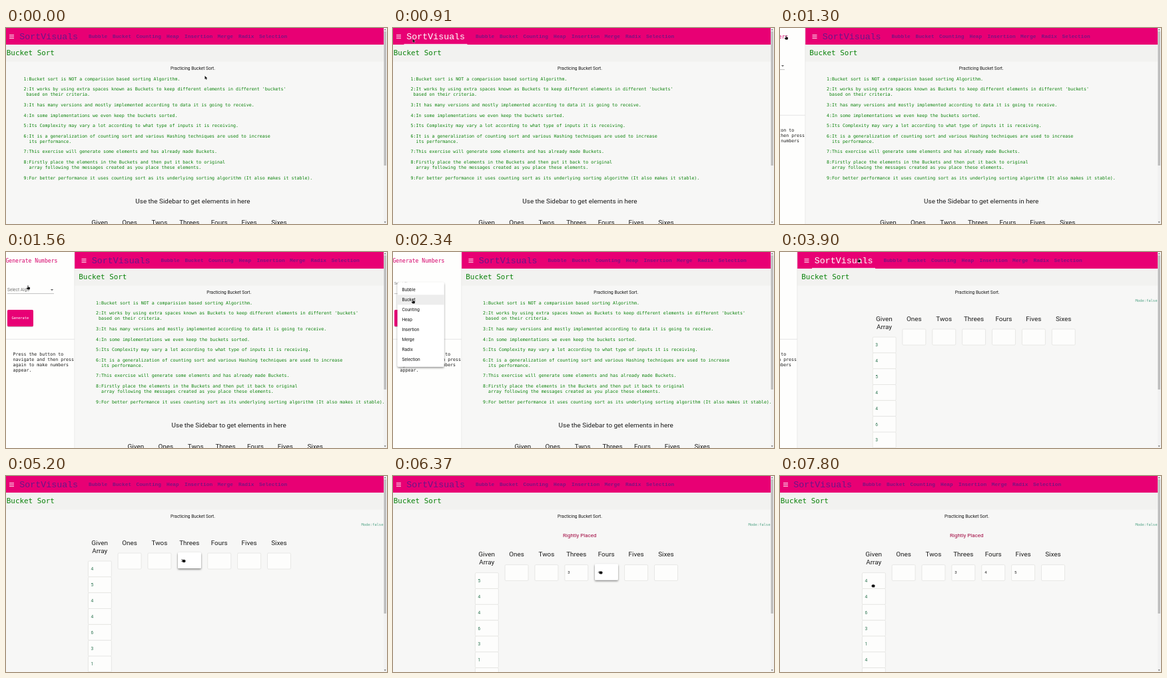
Animation of 572 by 295 pixels, one loop 8000 ms. Source, as an HTML page:

```html
<!DOCTYPE html>
<html lang="en">
<head>
<meta charset="utf-8">
<title>Bucket Sort</title>
<style>
  html, body { margin: 0; width: 100%; height: 100%; overflow: hidden; background: #f7f7f6; }
  svg { display: block; width: 572px; height: 295px; }
  text { font-family: Roboto, sans-serif; font-size: 6.62px; fill: #1c1c1c; white-space: pre; }
  .mono { font-family: "DejaVu Sans Mono", monospace; font-size: 6.61px; }
  .courier { font-family: "Liberation Mono", monospace; }
  .green { fill: #0a820a; }
  .big { font-size: 9.93px; }
  .mid { text-anchor: middle; }
  .cell { fill: #fdfdfc; stroke: #e2e2e0; stroke-width: .8; }
  .value { fill: #2b7350; }
</style>
</head>
<body>
<svg id="stage" viewBox="0 0 572 295">
  <defs>
    <filter id="lift" x="-30%" y="-30%" width="160%" height="180%">
      <feDropShadow dx="0" dy="1.6" stdDeviation="1.7" flood-color="#000" flood-opacity=".45"/>
    </filter>
    <filter id="rest" x="-20%" y="-20%" width="140%" height="150%">
      <feDropShadow dx="0" dy=".7" stdDeviation=".6" flood-color="#000" flood-opacity=".3"/>
    </filter>
  </defs>
  <g id="drawer"></g>
  <g id="main"></g>
  <g id="center"></g>
  <text id="mode" class="mono" x="566.5" y="75" text-anchor="end" style="font-size:5.5px;fill:#55a588">Mode:false</text>
  <g id="scroll">
    <rect x="567" width="5" height="295" fill="#f1f1f1"/>
    <rect x="567.4" y="5" width="3.4" height="202" fill="#bcbcbc"/>
    <path d="M567.6 3.2l1.5-1.7 1.5 1.7zM567.6 291.6l1.5 1.7 1.5-1.7z" fill="#555"/>
  </g>
  <g id="menu"></g>
  <g id="card"></g>
  <g id="cursor"></g>
</svg>
<script>
const LOOP = 8000, STEP = 130;
const OPEN = 108.5, PINK = '#e80074';
const $ = id => document.getElementById(id);
const text = (x, y, str, cls = '', style = '') =>
  `<text x="${x}" y="${y}" class="${cls}" style="${style}">${str}</text>`;
const show = (el, on) => el.setAttribute('display', on ? 'inline' : 'none');
const move = (el, x, y = 0) => el.setAttribute('transform', `translate(${x} ${y})`);
const clamp = v => Math.max(0, Math.min(1, v));
const ease = v => v * v * (3 - 2 * v);

// Value of a list of [time, ...numbers] keys at time t.
function track(keys, t, curve = v => v) {
  let i = keys.length - 1;
  while (i > 0 && keys[i][0] > t) i--;
  const a = keys[i], b = keys[i + 1] || a;
  const p = b === a ? 0 : curve(clamp((t - a[0]) / (b[0] - a[0])));
  return a.slice(1).map((v, k) => typeof v === 'number' ? v + (b[k + 1] - v) * p : v);
}

// ---- timeline ----
const slide = [[0, 0], [1170, 0], [1300, 43.5], [1430, 99], [1560, OPEN],
  [3770, OPEN], [3900, 31.5], [4030, 0]];
const path = [
  [0, 298.5, 72, 'arrow'], [260, 298.5, 72, 'arrow'], [1040, 8, 12, 'hand'],
  [1300, 9, 12, 'hand'], [1560, 33, 51, 'hand'], [1820, 33, 56, 'hand'],
  [1950, 33, 57, 'hand'], [2340, 30, 72, 'hand'], [2600, 30, 72, 'hand'],
  [2990, 11, 98, 'hand'], [3380, 11, 98, 'hand'], [3770, 117, 11, 'hand'],
  [3900, 118, 10, 'hand'], [4550, 132.5, 140.5, 'fist'], [4680, 132.5, 140.5, 'fist'],
  [5200, 267, 127.5, 'fist'], [5590, 267, 128, 'fist'], [5980, 132.5, 158, 'fist'],
  [6370, 312, 145, 'fist'], [6500, 312, 146, 'fist'], [6760, 132.5, 158, 'fist'],
  [7150, 357, 145, 'fist'], [7280, 357, 146, 'fist'], [7540, 285, 150, 'fist'],
  [7800, 140, 165, 'fist']
];
const menuOpen = 1950, menuClose = 2600, filled = 3380, message = 5460;
const drags = [
  { grab: 4680, drop: 5330, col: 3 },
  { grab: 5980, drop: 6500, col: 4 },
  { grab: 6760, drop: 7280, col: 5 }
];
const values = [3, 4, 5, 4, 4, 6, 3, 1, 4, 2, 5];
const ROW = 23.85;
const colX = i => 140.7 + i * 44.88;
const cell = (x, y, h = 24) => `<rect class="cell" x="${x}" y="${y}" width="35" height="${h}" rx="1.6"/>`;

// ---- side drawer, in its opened place ----
$('drawer').innerHTML = `
  <rect x="-10" width="113" height="295" fill="#fefefd"/>
  ${text(-.6, 15.6, 'Generate Numbers', 'mono', 'font-size:8.1px;fill:#d6006a')}
  <text id="label" x="2"></text>
  ${text(2, 59.2, '<tspan id="choice">Bucket</tspan>')}
  <path d="M2 62.6H72" stroke="#999" stroke-width=".6"/>
  <path d="M66.9 56h4.2l-2.1 2.2z" fill="#666"/>
  <rect id="button" x="2" y="87" width="39" height="25" rx="1.7" fill="${PINK}"/>
  ${text(8.4, 101.4, 'Generate', 'mono', 'font-size:5.4px;fill:#fff')}
  <path d="M-10 131.3H103" stroke="#dcdcdc" stroke-width=".7"/>
  ${['Press the button to', 'navigate and then press', 'again to make numbers', 'appear.']
    .map((s, i) => text(10.5, 156.2 + i * 7.83, s, 'mono')).join('')}`;

// ---- header and intro ----
const nav = { Bubble: 124, Bucket: 160, Counting: 195.5, Heap: 241, Insertion: 268,
  Merge: 317.5, Radix: 349, Selection: 380 };
const intro = [
  [0, 0, '1:Bucket sort is NOT a comparision based sorting Algorithm.'],
  [2, 0, "2:It works by using extra spaces known as Buckets to keep different elements in different 'buckets'"],
  [3, 1, 'based on their criteria.'],
  [5, 0, '3:It has many versions and mostly implemented according to data it is going to receive.'],
  [7, 0, '4:In some implementations we even keep the buckets sorted.'],
  [9, 0, '5:Its Complexity may vary a lot according to what type of inputs it is receiving.'],
  [11, 0, '6:It is a generalization of counting sort and various Hashing techniques are used to increase'],
  [12, 2, 'its performance.'],
  [14, 0, '7:This exercise will generate some elements and has already made Buckets.'],
  [16, 0, '8:Firstly place the elements in the Buckets and then put it back to original'],
  [17, 2, 'array following the messages created as you place these elements.'],
  [19, 0, '9:For better performance it uses counting sort as its underlying sorting algorithm (It also makes it stable).']
];
$('main').innerHTML = `
  <rect x="-5.6" width="600" height="295" fill="#f7f7f6"/>
  <rect x="-5.6" y="25" width="600" height="25.5" fill="#f2f2f0"/>
  <rect x="-5.6" width="600" height="25" fill="${PINK}"/>
  <path d="M-5.6 0V295" stroke="#ddd" stroke-width=".6"/>
  <path d="M5 10.6h7M5 13h7M5 15.4h7" stroke="#fff" stroke-width=".9"/>
  <text id="logo" class="courier" x="20.3" y="17" style="font-size:13.3px">SortVisuals</text>
  <path id="logoLine" d="M16.5 24.4H111.5" stroke="#fff" stroke-width=".9"/>
  ${Object.entries(nav).map(([s, x]) =>
    text(x, 15.3, s, 'courier', 'font-size:7.8px;font-weight:bold;fill:#7d1280')).join('')}
  ${text(.8, 41.4, 'Bucket Sort', 'mono green', 'font-size:10.9px')}
  <g id="intro">${intro.map(([row, pad, s]) =>
    text(26.6 + pad * 3.98, 78.8 + row * 7.83, s, 'mono green')).join('')}</g>`;

// ---- centred content ----
const titles = ['Given', 'Ones', 'Twos', 'Threes', 'Fours', 'Fives', 'Sixes'];
$('center').innerHTML = `
  ${text(280.5, 62.8, 'Practicing Bucket Sort.', 'mid')}
  ${text(280.5, 264.2, '<tspan id="hint">Use the Sidebar to get elements in here</tspan>', 'mid big')}
  ${text(280.3, 91.6, '<tspan id="note" fill="#a0053f">Rightly Placed</tspan>', 'mid', 'font-size:8.03px')}
  <g id="table">
    ${titles.map((s, i) => text(colX(i), 103.8, s, 'mid big')).join('')}
    ${text(colX(0), 115.8, 'Array', 'mid big')}
    <g id="lists">
      ${titles.slice(1).map((s, i) => cell(colX(i + 1) - 17.5, 116)).join('')}
      ${drags.map((d, i) => `<text id="placed${i}" x="${colX(d.col) - 13}" y="129.3" style="font-size:5.9px">${values[i]}</text>`).join('')}
      ${values.map((v, i) => `<g id="row${i}">${cell(123.4, 128)}${text(127.4, 142.4, v, 'value')}</g>`).join('')}
    </g>
  </g>`;

$('menu').innerHTML = `
  <rect x="6.7" y="45.8" width="70" height="127" rx="1.7" fill="#fff" filter="url(#lift)"/>
  <rect id="hover" x="6.7" width="70" height="15" fill="#ededed"/>
  ${Object.keys(nav).map((s, i) => text(13.4, 59.2 + i * 15, s)).join('')}`;

$('card').innerHTML = `
  <rect x="0" y="0" width="35" height="24" rx="1.6" fill="#fff" filter="url(#lift)"/>
  <text id="cardValue" x="4.5" y="14.2" style="font-size:5.9px;fill:#444"></text>`;

// Pointers are drawn around their hot spot.
const shapes = {
  arrow: 'M0 0V5.2L1.3 4 2.2 6 3.1 5.6 2.2 3.7H3.9Z',
  hand: 'M-.5-.4Q0-1 .5-.4V1.7L2.8 2.2Q3.3 2.5 3.1 3.3L2.5 5.6H-.6L-2.2 3.4Q-2.2 2.5-1.4 2.7L-.5 3.3Z',
  fist: 'M-2.3-.6Q-1.5-2-.5-1.4 .5-2 1.2-1.2 2.4-1.4 2.5-.2V1L1.8 2.5H-1.4L-2.6 1Z'
};
$('cursor').innerHTML = Object.entries(shapes).map(([k, d]) =>
  `<path id="${k}" d="${d}" fill="#111" stroke="#fff" stroke-width=".5" paint-order="stroke"/>`).join('');

function render(t) {
  const [s] = track(slide, t);
  const [x, y, kind] = track(path, t, ease);
  const hasData = t >= filled, picking = t >= menuOpen && t < menuClose;
  const dy = t >= message ? 17.6 : 0;

  move($('drawer'), s - OPEN);
  move($('main'), s);
  move($('center'), s / 2);
  move($('table'), 0, hasData ? dy : 192.2);

  const onLogo = y < 25 && x > s + 19 && x < s + 110;
  $('logo').style.fill = onLogo ? '#fff' : '#6a1688';
  show($('logoLine'), onLogo);

  const small = t >= menuOpen;
  const label = $('label');
  label.textContent = 'Select Algo';
  label.setAttribute('y', small ? 49.2 : 59.2);
  label.style.fontSize = small ? '4.96px' : '6.62px';
  label.style.fill = '#777';
  show($('choice').parentNode, t >= menuClose);
  const onButton = s === OPEN && x > 2 && x < 41 && y > 87 && y < 112;
  $('button').setAttribute('filter', `url(#${onButton ? 'lift' : 'rest'})`);

  show($('menu'), picking);
  $('hover').setAttribute('y', 49.4 + 15 * Math.max(0, Math.floor((y - 49.4) / 15)));

  show($('intro'), !hasData);
  show($('hint').parentNode, !hasData);
  show($('mode'), hasData);
  show($('lists'), hasData);
  show($('note').parentNode, t >= message);

  // Rows close the gap once the first one is lifted out.
  let gone = 0, held = -1;
  drags.forEach((d, i) => {
    gone += ease(clamp((t - d.grab - 60) / 260));
    if (t > d.grab && t < d.drop) held = i;
    show($('row' + i), t <= d.grab);
    show($('placed' + i), t >= d.drop);
  });
  values.forEach((v, i) => move($('row' + i), 0, (i - gone) * ROW));

  show($('card'), held >= 0);
  if (held >= 0) {
    move($('card'), x - 9, y - 12.5);
    $('cardValue').textContent = values[held];
  }

  move($('cursor'), x, y);
  Object.keys(shapes).forEach(k => show($(k), k === kind));
}

function frame(now) {
  const t = now % LOOP;
  render(Math.min(Math.floor(t / STEP) * STEP, 7800));
  requestAnimationFrame(frame);
}
render(0);
requestAnimationFrame(frame);
</script>
</body>
</html>
```
